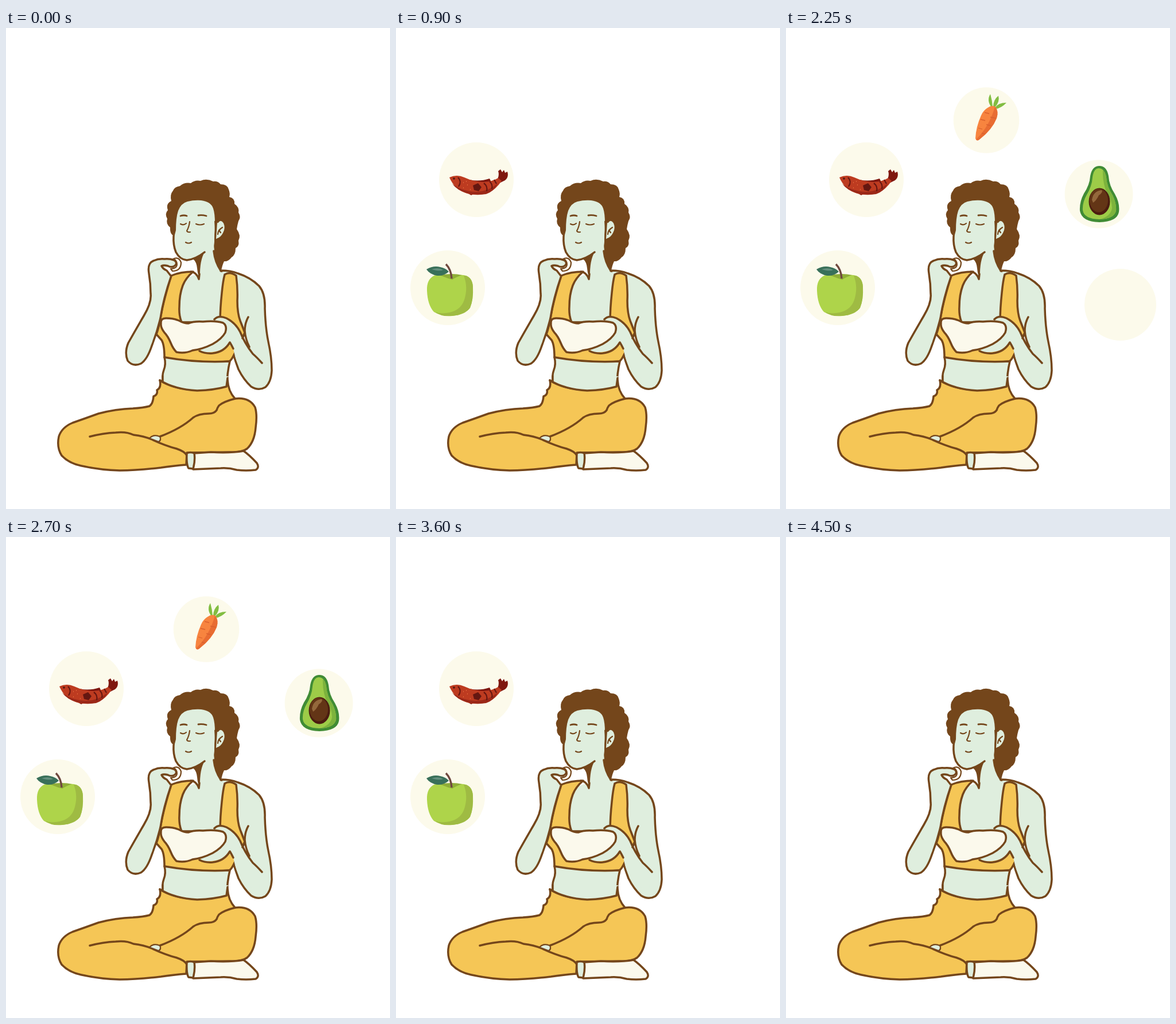
An HTML page for the animation above (4.95 s loop, 669x837 px).

```html
<!DOCTYPE html>
<html lang="en">
<head>
<meta charset="utf-8">
<title>Healthy snack</title>
<style>
html, body { margin: 0; width: 100%; height: 100%; overflow: hidden; background: #fff; }
svg { display: block; width: 100vw; height: 100vh; }
.skin { fill: #dfeede; }
.cloth { fill: #f5c656; }
.cream { fill: #fbf9ec; }
.hair { fill: #74461b; }
.ink { stroke: #74461b; stroke-width: 3.5; stroke-linecap: round; stroke-linejoin: round; }
.line { fill: none; }
.thin { stroke-width: 2.2; }
.food { visibility: hidden; }
.disc { fill: #fcfaeb; }
</style>
</head>
<body>
<svg viewBox="0 0 669 837">
<!-- hair -->
<path class="hair" d="M296 363Q285 361 286 347Q278 341 281 332Q276 323 282 317Q278 306 288 301Q285 290 291 283Q294 276 303 275Q311 268 322 270Q329 264 339 266Q349 261 361 267Q369 266 374 272Q386 272 388 281Q391 288 389 294Q399 296 398 306Q407 312 405 321Q410 329 405 336Q403 343 402 350Q410 361 405 370Q407 380 400 383Q400 395 393 399Q387 407 380 406Q377 412 375 422L350 420L320 340Z"/>
<path class="ink line" style="stroke-width:1.2" d="M285 304Q279 309 284 314M284 319Q279 326 284 332"/>

<!-- neck, chest and far arm -->
<path class="skin" d="M334 396L364 340L362 378Q364 405 373 421L404 427L418 532L392 568L300 540L300 440L334 428Z"/>
<path class="skin ink" d="M374 422Q392 422 404 427Q426 434 441 449Q452 462 451 488Q452 522 457 546Q463 573 463 596Q462 616 452 625Q440 632 427 624Q414 612 405 594Q400 581 396 567L388 520L404 500Z"/>
<path class="skin" d="M371 424L403 430L406 500L380 510L360 440Z"/>

<!-- face -->
<path class="skin" d="M316 302Q328 299 340 300Q357 302 361 314Q364 323 364 340Q363 352 363 372L361 390L346 391Q330 404 314 404Q298 399 294 380Q291 368 296 352Q296 330 300 318Q305 305 316 302Z"/>
<path class="ink line" d="M292 362Q291 378 296 390Q303 403 315 404Q331 402 346 390"/>
<path class="hair" d="M326 402Q338 398 347 388Q337 404 338 434Q334 431 333 418Q332 407 326 402Z"/>
<path class="hair" d="M363 336L371 333L368 342L367 354L364 352Z"/>
<path class="skin" d="M368 338Q374 331 380 339Q384 347 379 357Q374 367 366 367Z"/>
<path class="ink line thin" d="M369 338Q374 331 380 339Q384 348 379 357Q375 365 368 367M377 347Q369 352 369 359M371 352L374 356"/>
<path class="ink line" style="stroke-width:2.8" d="M304 327Q310 325 315 327M335 326Q342 325 349 327"/>
<path class="ink line thin" d="M304 341Q309 344 314 340M331 341Q338 344 345 341M320 337Q319 346 315 353Q316 356 321 355M313 373Q318 376 323 373"/>

<!-- top -->
<path class="cloth ink" d="M288 431Q304 424 326 424Q313 435 308 448Q302 464 302 485Q301 500 306 512L373 512Q373 489 376 461Q378 440 381 429Q390 423 401 431Q404 453 403 475Q403 498 409 512L416 530Q411 543 398 567Q393 578 389 580Q362 583 334 580Q300 580 276 573Q276 551 271 543L262 533Q267 519 270 500Q275 472 288 431Z"/>
<path class="ink line" d="M322 424Q332 425 336 437L337 428M362 388Q364 407 374 422"/>

<!-- waist -->
<path class="skin ink" d="M276 573Q279 585 275 595Q271 606 274 617Q296 629 333 630Q365 630 385 623Q385 601 390 580Q333 583 276 573Z"/>

<!-- legs -->
<path class="cloth ink" d="M268 613Q290 628 333 630Q365 630 386 612Q387 632 399 645Q424 642 434 660Q438 673 435 695Q433 720 420 732Q411 739 390 738L315 739L314 760Q290 762 270 765Q229 770 198 770Q165 769 137 763Q111 759 97 744Q88 730 92 711Q97 695 116 687Q139 679 161 671Q191 663 221 662Q239 661 250 658Q256 654 257 641Q265 638 263 630Q271 626 268 613Z"/>
<path class="skin" d="M274 606L273 616Q328 640 384 624L387 606Z"/>
<path class="ink line" d="M268 613Q294 629 333 631Q363 630 384 624L386 609M273 606L273 615"/>
<path class="ink line" d="M399 645Q379 650 371 657Q368 661 367 665Q363 671 353 671Q336 671 326 678Q305 697 268 711"/>
<path class="ink line" d="M146 711Q169 705 191 704Q210 702 222 708Q240 710 254 716Q278 727 297 732Q312 737 315 744"/>
<path class="skin ink thin" d="M250 714Q257 706 268 711Q271 717 266 720Z"/>

<!-- foot -->
<path class="cream ink" d="M327 740L357 738Q390 740 414 736Q424 743 437 757Q442 765 435 769Q418 771 402 769Q388 765 374 766L326 768Z"/>
<path class="skin ink" d="M315 740Q321 737 328 740Q330 752 326 767L318 766Q314 760 315 740Z"/>

<!-- near hand and bowl -->
<path class="skin" d="M362 506Q370 499 384 505Q398 512 407 528Q416 548 430 566L446 583L440 616L415 604Q402 588 396 558L388 550Q375 567 338 564Z"/>
<path class="ink line" d="M396 558Q393 552 390 547Q380 564 360 566Q347 567 337 562"/>
<path d="M416 532Q420 540 425 553L422 557L413 543Z" fill="#fff"/>
<path class="ink line" d="M363 507Q370 499 384 505Q400 513 408 529Q416 549 430 567Q437 573 446 583M422 503Q416 514 416 527Q417 541 424 555M416 531L412 540"/>
<path class="cream ink" d="M270 514Q269 505 279 505Q291 505 301 509Q310 514 318 514Q327 510 343 511Q365 509 378 513Q386 518 382 530Q376 541 360 550Q342 559 325 561Q312 567 297 564Q291 558 287 548Q282 536 276 530Q269 521 270 514Z"/>

<!-- raised arm and snack -->
<path class="skin" d="M287 432L276 418L287 414L301 412L295 402L264 403Q247 406 249 420L253 455Q254 477 243 495Q226 525 214 545Q206 561 211 577Q220 588 233 585Q245 577 252 557Q264 530 270 500Q276 462 287 432Z"/>
<path class="cream ink thin" d="M291 402Q301 397 305 408Q305 423 290 423L287 419Q301 418 297 407Q295 402 291 402Z"/>
<path class="ink line" d="M288 431Q274 471 269 505Q263 530 254 553Q246 577 235 584Q221 590 212 579Q206 565 213 548Q226 525 240 501Q254 478 252 462Q252 445 249 427Q246 409 257 405Q266 401 276 402Q285 401 293 404Q299 408 295 413Q289 418 282 414Q275 412 271 414Q273 419 280 422L287 431"/>

<!-- apple -->
<g class="food">
  <circle class="disc" cx="90" cy="452" r="65"/>
  <path fill="#aed44a" d="M97 436Q79 426 66 431Q53 438 54 457Q55 482 66 494Q79 502 98 501Q120 499 129 487Q135 473 134 450Q133 435 122 431Q108 427 97 436Z"/>
  <path fill="#9fbb43" d="M118 431Q126 451 119 473Q112 494 86 496Q75 497 68 494Q79 503 98 501Q120 499 129 487Q135 473 134 450Q133 435 122 431Z"/>
  <path fill="#8fae37" d="M76 430Q99 426 115 430Q105 433 98 438Q88 435 76 430Z"/>
  <path fill="#39705a" d="M53 420Q65 413 77 416Q87 418 92 424Q83 432 72 431Q59 429 53 420Z"/>
  <path fill="#659080" d="M62 420Q74 416 82 421Q76 424 62 420Z"/>
  <path d="M87 411Q96 420 97 436" fill="none" stroke="#70483f" stroke-width="3.4"/>
</g>

<!-- fish -->
<g class="food">
  <circle class="disc" cx="140" cy="264" r="65"/>
  <path fill="#7f1710" d="M174 267Q181 258 178 249L182 246L185 251L188 247L190 252L194 250Q197 259 190 265L178 271ZM128 264Q145 268 163 262L166 268L145 272ZM122 286L131 291L139 287Z"/>
  <path fill="#bd3b20" d="M93 260Q106 254 119 260Q136 268 153 268Q168 267 178 261L184 266Q174 281 161 287Q143 293 124 288Q102 281 93 260Z"/>
  <path fill="#9b2818" d="M98 271Q116 285 141 285Q162 284 178 270Q170 285 157 289Q138 292 122 287Q106 282 98 271Z"/>
  <path d="M108 260Q115 267 109 276M153 270Q160 275 158 284M163 267Q169 272 167 280M171 264L175 271" fill="none" stroke="#651711" stroke-width="2.2"/>
  <path fill="#651711" d="M134 274L143 270L149 277L144 284L136 282Z"/>
  <circle cx="101" cy="262" r="1.8" fill="#4c1713"/>
  <path d="M117 269h1m6 4h1m-8 5h1m11 3h1m-8-14h1" stroke="#e36b3b" stroke-width="2"/>
</g>

<!-- carrot -->
<g class="food">
  <circle class="disc" cx="349" cy="160.5" r="57.3"/>
  <path fill="#82bd42" d="M358 138Q349 126 356 115Q359 125 360 137ZM361 137Q361 125 370 118Q373 128 364 138ZM364 139Q369 130 384 130Q376 139 365 141Z"/>
  <path fill="#f7843f" d="M351 139Q358 133 365 137Q371 145 367 157Q359 177 337 194Q332 198 330 192Q331 172 340 152Q344 143 351 139Z"/>
  <path fill="#e86c32" d="M364 137Q371 145 367 157Q359 177 337 194Q333 197 331 194Q354 172 364 137Z"/>
  <path d="M346 147L354 149M356 155L365 157M339 159L347 161M349 168L357 170M335 174L342 176M341 183L346 184" stroke="#d9602d" stroke-width="1.3"/>
</g>

<!-- avocado -->
<g class="food">
  <circle class="disc" cx="545" cy="289" r="59.5"/>
  <path fill="#408c35" d="M546 240Q559 240 562 258Q563 274 573 289Q582 305 580 320Q577 337 546 338Q515 337 512 318Q511 303 519 288Q529 273 530 258Q533 240 546 240Z"/>
  <path fill="#9dcc48" d="M545 244Q555 244 558 260Q559 276 569 291Q576 305 575 318Q572 332 546 333Q519 332 517 317Q516 304 524 290Q533 275 534 260Q536 244 545 244Z"/>
  <path fill="#7db33d" d="M552 247Q557 251 558 260Q559 276 569 291Q576 305 575 318Q572 332 546 333Q566 328 568 313Q568 300 560 289Q551 270 552 247Z"/>
  <ellipse cx="546" cy="302" rx="18.5" ry="23.5" fill="#4b1c10"/>
  <ellipse cx="545" cy="300" rx="16" ry="20.5" fill="#633516"/>
  <path fill="#94683c" d="M533 299Q535 284 550 282Q553 286 545 291Q541 300 535 304Z"/>
</g>

<g class="food">
  <circle class="disc" cx="582.5" cy="481.5" r="62.5"/>
</g>
</svg>
<script>
const STEP = 450, STEPS = 11;
const foods = document.querySelectorAll('.food');

// Foods appear one by one, then leave in reverse order.
function draw(now) {
  const step = Math.floor(now / STEP) % STEPS;
  foods.forEach((food, i) => {
    const shown = step > i && step < STEPS - 1 - i;
    food.style.visibility = shown ? 'visible' : 'hidden';
  });
}

const start = performance.now();
function tick() {
  draw(performance.now() - start);
  requestAnimationFrame(tick);
}
tick();
</script>
</body>
</html>
```
